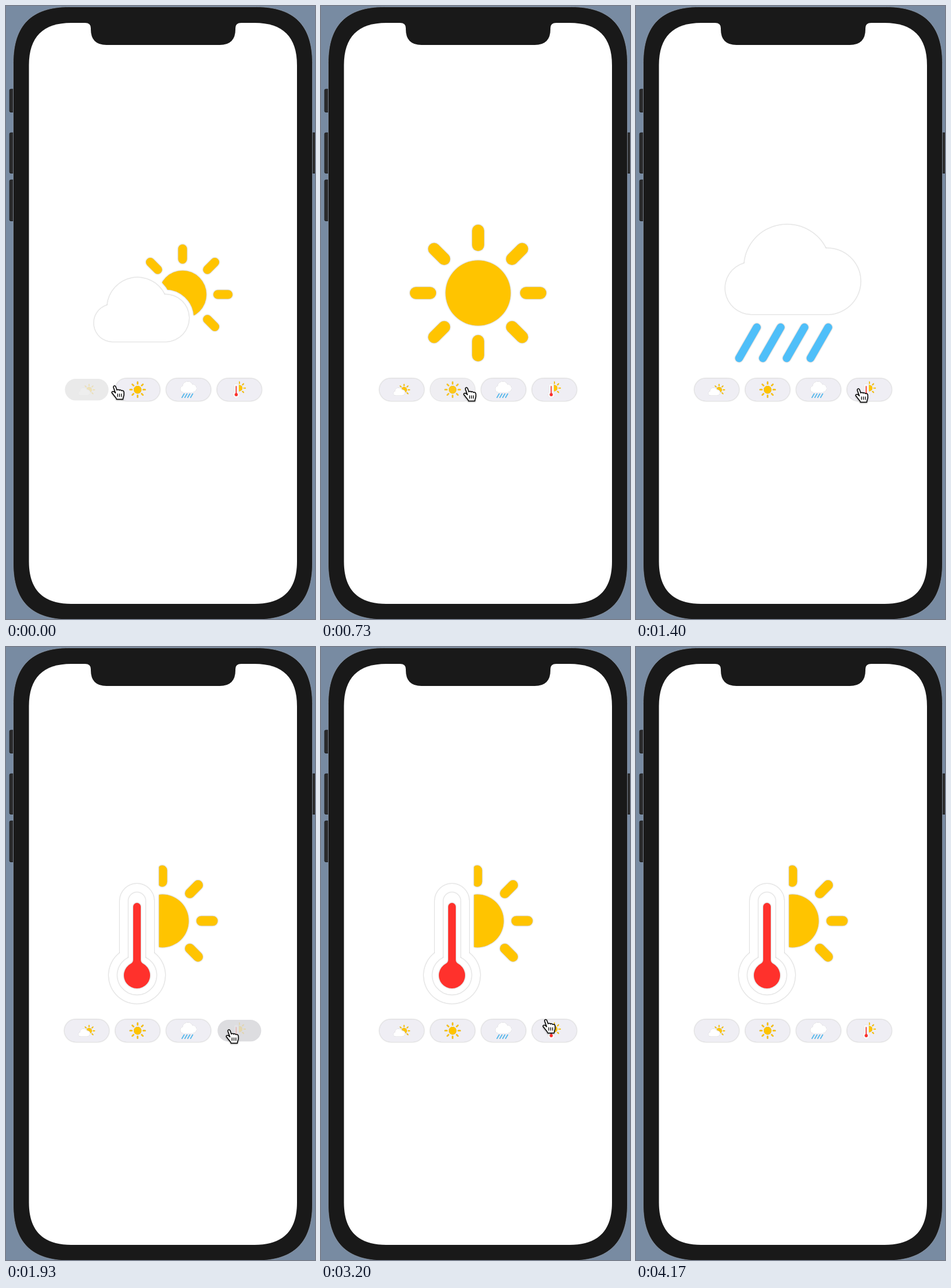
Write an HTML page that moves like this. It is 532x1054 px and loops after 4.43 s.

```html
<!DOCTYPE html>
<html lang="en">
<head>
<meta charset="utf-8">
<title>Weather picker</title>
<style>
  html, body { margin: 0; width: 100%; height: 100%; overflow: hidden; background: #788ba2; }
  svg { display: block; width: 532px; height: 1054px; }
  .edge { filter: drop-shadow(0 0 .8px rgba(0, 0, 0, .34)); }
  .soft { filter: blur(.6px); }
  .hand { filter: drop-shadow(0 1.5px 1px rgba(0, 0, 0, .4)); }
</style>
</head>
<body>
<svg viewBox="0 0 532 1054">
  <defs>
    <path id="cloudShape" d="M183 577A32 32 0 0 1 174.5 514.3A52 52 0 0 1 273 496A40.5 40.5 0 0 1 276 577Z"/>
    <mask id="cut" maskUnits="userSpaceOnUse" x="100" y="380" width="340" height="240">
      <rect x="100" y="380" width="340" height="240" fill="#fff"/>
      <use href="#cloudShape" stroke="#000" stroke-width="17"/>
    </mask>
    <clipPath id="half"><rect x="263.5" y="360" width="150" height="220"/></clipPath>

    <g id="partly">
      <g class="edge"><g id="partlySun" mask="url(#cut)"></g></g>
      <use href="#cloudShape" class="edge" fill="#fff"/>
    </g>
    <g id="sunny" class="edge"></g>
    <g id="rainy">
      <g class="edge"><use href="#cloudShape" fill="#fff" transform="matrix(1.424 0 0 1.402 -62 -278.9)"/></g>
      <g id="drops" class="edge" stroke="#4fbff9" stroke-width="13.5" stroke-linecap="round"></g>
    </g>
    <g id="warm">
      <g class="edge"><g id="warmSun" clip-path="url(#half)"></g></g>
      <path class="edge" fill="#fff" d="M196 526V436.5A29.5 29.5 0 0 1 255 436.5V526A48.5 48.5 0 1 1 196 526Z"/>
      <path class="edge" fill="#fff" d="M211 534V436.5A14.5 14.5 0 0 1 240 436.5V534A33.5 33.5 0 1 1 211 534Z"/>
      <path class="edge" fill="#ff312c" d="M219 538V446.5A6.5 6.5 0 0 1 232 446.5V538Q232 542 236 544.6A22.5 22.5 0 1 1 215 544.6Q219 542 219 538Z"/>
    </g>
  </defs>

  <rect width="532" height="1054" fill="#788ba2"/>
  <g fill="#2a2a2b" stroke="#1b1b1c">
    <rect x="6.2" y="143" width="12" height="39.5" rx="2"/>
    <rect x="6.2" y="218" width="12" height="69.5" rx="2"/>
    <rect x="6.2" y="299" width="12" height="70.5" rx="2"/>
    <rect x="522" y="218" width="14" height="69.5" rx="2"/>
  </g>
  <path id="body" fill="#191919" stroke="#8e9aa8" stroke-width=".8"/>
  <path id="screen" fill="#fff"/>
  <path fill="#191919" d="M136 28V29Q146 29 146 38V40Q146 67 173 67H368Q395 67 395 40V38Q395 29 405 29V28Z"/>

  <g id="stage"></g>
  <g id="buttons"></g>
  <g id="cursor" class="hand">
    <path fill="#fff" stroke="#000" stroke-width="1.5" stroke-linejoin="round" d="M7.6 14.5L4.3 5.2C3.2 2 6.6 .7 7.8 3.6L10 9.6C10.6 8 13.4 8 14 9.8C15 8.6 17.3 9 17.8 10.6C19.4 9.6 21.8 10.6 22 13V17C22 20 20.6 21 20.3 25.3H9.5C9 22.5 6 20.5 3.6 16.8C2.6 15.2 1 14.6 1.2 13C1.6 11.2 4.6 11.4 5.6 12.6Z"/>
    <path fill="none" stroke="#000" stroke-width="1.3" d="M11.2 15.5V21M14.5 15.5V21M17.8 15.5V21"/>
  </g>
</svg>
<script>
const LOOP = 4430;
const YELLOW = '#ffc400';
const $ = id => document.getElementById(id);

// Rounded panel with continuous corners of length c
function panel(l, t, r, b, c) {
  const k = c * .33;
  return `M${l} ${t + c}C${l} ${t + k} ${l + k} ${t} ${l + c} ${t}H${r - c}` +
    `C${r - k} ${t} ${r} ${t + k} ${r} ${t + c}V${b - c}` +
    `C${r} ${b - k} ${r - k} ${b} ${r - c} ${b}H${l + c}` +
    `C${l + k} ${b} ${l} ${b - k} ${l} ${b - c}Z`;
}

// Disc with rays; angles count eighths of a turn from the right
function sun(x, y, s, from, to) {
  let rays = '';
  for (let i = from; i <= to; i++)
    rays += `<path d="M60.5 0H78.5" transform="rotate(${i * 45})"/>`;
  return `<g transform="translate(${x} ${y}) scale(${s})"><circle r="41" fill="${YELLOW}"/>` +
    `<g stroke="${YELLOW}" stroke-width="15" stroke-linecap="round">${rays}</g></g>`;
}

$('body').setAttribute('d', panel(12.5, 1.5, 527.5, 1055, 96));
$('screen').setAttribute('d', panel(39.5, 29, 501, 1028, 73));
$('partlySun').innerHTML = sun(304, 496, 1, -3, 1);
$('sunny').innerHTML = sun(270.5, 493.5, 1.365, 0, 7);
$('warmSun').innerHTML = sun(269, 471, 1.11, -2, 1);
$('drops').innerHTML = [0, 1, 2, 3].map(i =>
  `<path d="M${208 + i * 41} 552.5l-30.5 53"/>`).join('');

// at: when the large icon appears; press: down, full, release, rest
const items = [
  { icon: 'partly', at: 0, press: [-80, -20, 50, 260], tint: '#eaeaea' },
  { icon: 'sunny', at: 520, press: [390, 470, 570, 780], tint: '#eaeaea' },
  { icon: 'rainy', at: 1025, press: [920, 990, 1085, 1300], tint: '#eaeaea' },
  { icon: 'warm', at: 1830, press: [1710, 1790, 1940, 2130], tint: '#dddde0' }
];

$('stage').innerHTML = items.map(o => `<use href="#${o.icon}"/>`).join('');
$('buttons').innerHTML = items.map((o, i) =>
  `<g transform="translate(${139 + i * 87.6} 659.7)">` +
  `<rect class="edge" x="-38.3" y="-19.3" width="76.6" height="38.6" rx="19.3" fill="#efeef4"/>` +
  `<rect class="soft" x="-37.6" y="-18.6" width="75.2" height="37.2" rx="18.6" fill="${o.tint}"/>` +
  `<use href="#${o.icon}" transform="scale(.12) translate(-270.5 -493.5)"/></g>`).join('');

items.forEach((o, i) => {
  o.big = $('stage').children[i];
  [o.pill, o.dim, o.small] = $('buttons').children[i].children;
});

const path = [
  [0, 181, 651], [160, 205, 654], [570, 206, 654], [900, 286, 654], [1090, 286, 654],
  [1360, 377, 656], [1930, 378, 656], [2960, 378, 656], [3200, 381, 638.5],
  [3390, 382, 635.5], [3690, 382, 635.5]
];

const clamp = v => Math.min(1, Math.max(0, v));
const ease = v => v * v * (3 - 2 * v);

function pointer(t) {
  let i = 0;
  while (i < path.length - 2 && path[i + 1][0] <= t) i++;
  const [t0, x0, y0] = path[i], [t1, x1, y1] = path[i + 1];
  const p = ease(clamp((t - t0) / (t1 - t0)));
  return [x0 + (x1 - x0) * p, y0 + (y1 - y0) * p];
}

function draw(t) {
  items.forEach((o, i) => {
    const next = items[i + 1];
    const on = t >= o.at && (!next || t < next.at);
    o.big.setAttribute('visibility', on ? 'visible' : 'hidden');

    const [a, b, c, d] = o.press;
    const p = ease(clamp((t - a) / (b - a))) * (1 - ease(clamp((t - c) / (d - c))));
    o.pill.setAttribute('opacity', 1 - p);
    o.dim.setAttribute('opacity', Math.min(1, p * 1.6));
    o.small.setAttribute('opacity', 1 - .78 * p);
  });

  const [x, y] = pointer(t);
  const leave = clamp((t - 3690) / 130);
  $('cursor').setAttribute('transform', `translate(${x} ${y - 470 * leave ** 3})`);
  $('cursor').setAttribute('opacity', 1 - leave);
}

const start = performance.now();
function tick() {
  draw((performance.now() - start) % LOOP);
  requestAnimationFrame(tick);
}
tick();
</script>
</body>
</html>
```
